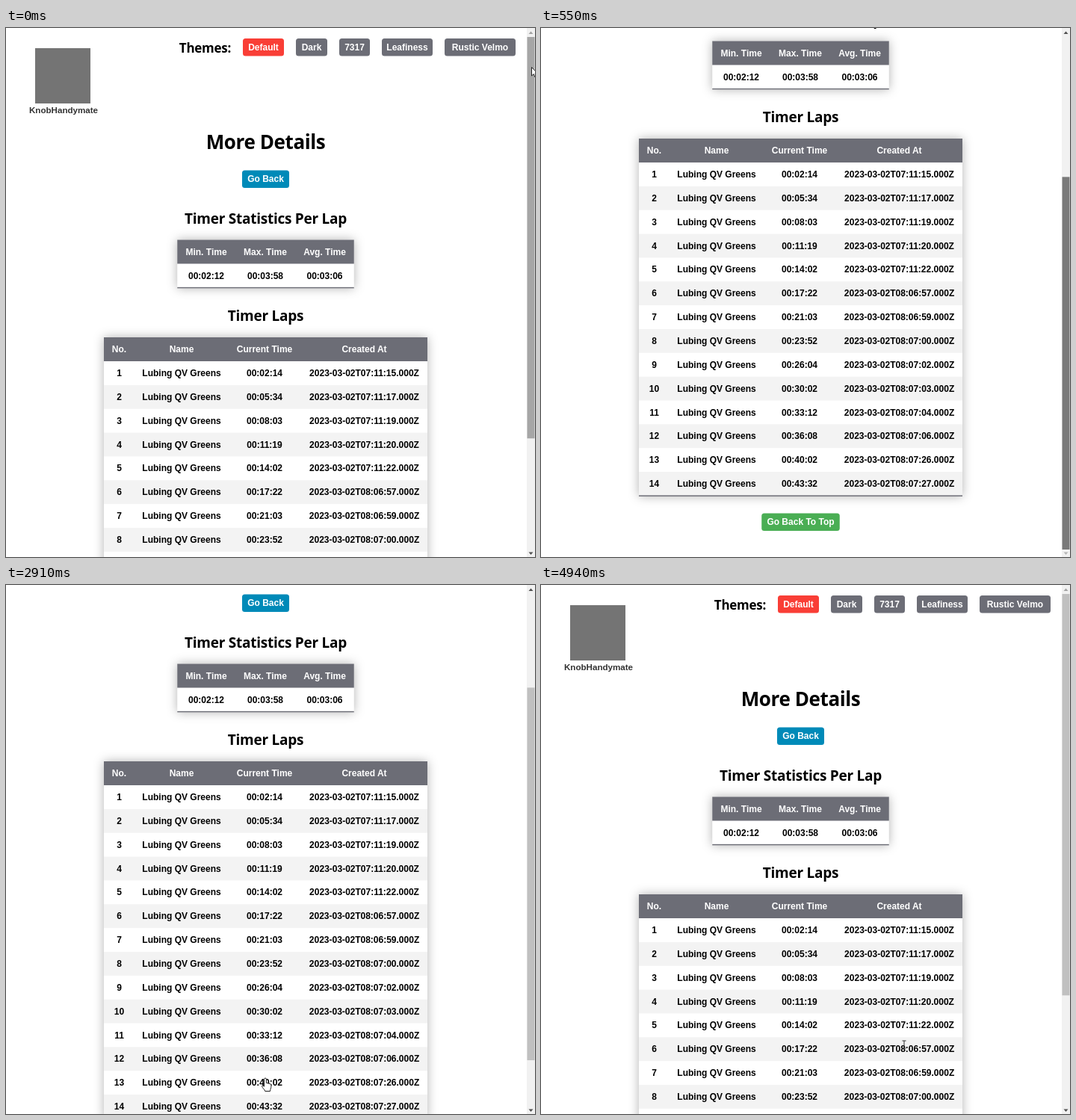
Recreate the animation shown at these times as an HTML page. Size 708 by 708 pixels, loop 4970 ms.

```html
<!DOCTYPE html>
<html lang="en">
<head>
<meta charset="utf-8">
<title>More Details</title>
<style>
  html, body { margin: 0; width: 100%; height: 100%; overflow: hidden; background: #fff; }
  svg { display: block; width: 708px; height: 708px; }
  text { font: bold 12px "Liberation Sans", Arial, sans-serif; text-anchor: middle; cursor: default; }
  .h1, .h2, .h3 { font-family: "Open Sans", "Noto Sans", sans-serif; }
  .h1 { font-size: 26px; letter-spacing: -.4px; }
  .h2 { font-size: 19px; letter-spacing: -.25px; }
  .h3 { font-size: 17px; letter-spacing: -.25px; }
  .brand { font-size: 11.6px; }
  .card { filter: drop-shadow(0 0 7px rgba(0, 0, 0, .3)); }
</style>
</head>
<body>
<svg id="stage" viewBox="0 0 708 708"></svg>
<script>
const LOOP = 4970;
const CENTER = 347.5;
const GREY = '#6c6d76';
const stage = document.getElementById('stage');

function add(parent, tag, attrs = {}, content = '') {
  const node = document.createElementNS('http://www.w3.org/2000/svg', tag);
  for (const key in attrs) node.setAttribute(key, attrs[key]);
  node.textContent = content;
  return parent.appendChild(node);
}

const page = add(stage, 'g');
const rect = (x, y, width, height, fill, more) =>
  add(page, 'rect', { x, y, width, height, fill, ...more });
const label = (content, x, y, fill = '#000', kind = '') =>
  add(page, 'text', { x, y, fill, class: kind }, content);

function button(content, center, top, width, fill) {
  const height = 23.5;
  rect(center - width / 2, top, width, height, fill, { rx: 3.5 });
  label(content, center, top + height / 2 + 4.2, '#fff');
}

// Columns are [heading, center]
function table(top, width, columns, rows) {
  const left = CENTER - width / 2, rowHeight = 31.85;
  const height = 33 + rows.length * rowHeight;
  rect(left, top, width, height, '#fff', { class: 'card' });
  rect(left, top, width, 32, GREY);
  columns.forEach(([head, x]) => label(head, x, top + 20.3, '#fff'));
  rows.forEach((row, r) => {
    const y = top + 32 + r * rowHeight;
    if (r % 2) rect(left, y, width, rowHeight, '#f3f3f3');
    row.forEach((cell, i) => label(cell, columns[i][1], y + 20));
  });
  rect(left, top + height - 1.5, width, 1.5, GREY);
}

// Page header
rect(39, 27, 74, 74, '#747474');
label('KnobHandymate', 77, 114, '#333', 'brand');
label('Themes:', 266.5, 33, '#000', 'h3');
const themes = { Default: 55, Dark: 42, '7317 ': 41, Leafiness: 68, 'Rustic Velmo': 95 };
let left = 317;
for (const name in themes) {
  const width = themes[name];
  button(name.trim(), left + width / 2, 14, width, name === 'Default' ? '#f93e36' : GREY);
  left += width + 16;
}

label('More Details', CENTER, 162, '#000', 'h1');
button('Go Back', CENTER, 190.5, 63, '#008ab8');

label('Timer Statistics Per Lap', CENTER, 261.5, '#000', 'h2');
table(283.5, 236.5, [['Min. Time', 268], ['Max. Time', 347], ['Avg. Time', 426.5]],
  [['00:02:12', '00:03:58', '00:03:06']]);

label('Timer Laps', CENTER, 392, '#000', 'h2');
const laps = `02:14 07:11:15,05:34 07:11:17,08:03 07:11:19,11:19 07:11:20,14:02 07:11:22,
  17:22 08:06:57,21:03 08:06:59,23:52 08:07:00,26:04 08:07:02,30:02 08:07:03,
  33:12 08:07:04,36:08 08:07:06,40:02 08:07:26,43:32 08:07:27`.split(',').map((lap, i) => {
  const [time, created] = lap.trim().split(' ');
  return [i + 1, 'Lubing QV Greens', `00:${time}`, `2023-03-02T${created}.000Z`];
});
table(414, 433,
  [['No.', 151.5], ['Name', 235], ['Current Time', 346], ['Created At', 479.5]], laps);
button('Go Back To Top', CENTER, 915.5, 104.5, '#4aae54');

// Scrollbar
add(stage, 'rect', { x: 697, width: 11, height: 708, fill: '#f1f1f1' });
const thumb = add(stage, 'rect', { x: 697.5, width: 10 });
const upArrow = add(stage, 'path', { d: 'M699.5 8l3-3.5 3 3.5z' });
const downArrow = add(stage, 'path', { d: 'M699.5 701.5l3 3.5 3-3.5z' });

// Mouse pointers, each with its hot spot at 0,0
const outline = { fill: '#fff', stroke: '#222', 'stroke-linejoin': 'round' };
const pointers = {
  arrow: add(stage, 'path', { ...outline, d: 'M.5 .5V12L3.2 9.6L5 14L6.9 13.2L5 9H8.6Z' }),
  hand: add(stage, 'path', { ...outline,
    d: 'M-1.4 1.4a1.4 1.4 0 0 1 2.8 0V6.4L6 7.4q2 .5 2 2.6c0 3.6-1.5 4.5-1.5 7.5H-.3c0-2-3.7-4-4.2-7q.3-1.5 3.1 .6Z' }),
  beam: add(stage, 'path', { fill: 'none', stroke: '#333', d: 'M-2.5 -5H2.5M0 -5V5M-2.5 5H2.5' })
};

const MAX_SCROLL = 266;
const progress = (t, from, length) => Math.min(1, Math.max(0, (t - from) / length));
const easeInOut = k => k * k * (3 - 2 * k);

// The thumb is dragged down, later the button scrolls back up
function scrollAt(t) {
  const down = progress(t, 0, 550) ** 1.19;
  const up = easeInOut(progress(t, 2728, 475));
  return MAX_SCROLL * (down - up);
}

// Key points of the mouse path: time, x, y
const path = [
  [0, 703, 52], [30, 712, 52], [700, 712, 320], [1090, 614, 640], [1640, 535, 657],
  [1700, 495, 658], [2300, 347, 660], [3940, 347, 661], [4490, 418, 645], [4640, 486, 615]
];

function mouseAt(t) {
  const next = path.findIndex(([time]) => time > t);
  if (next < 0) return path[path.length - 1].slice(1);
  const [t0, x0, y0] = path[next - 1], [t1, x1, y1] = path[next];
  const k = progress(t, t0, t1 - t0);
  return [Math.round(x0 + (x1 - x0) * k), Math.round(y0 + (y1 - y0) * k)];
}

function pointerAt(t, x) {
  if (t >= 3270) return x > 404 ? 'beam' : 'arrow';
  return t > 1700 && x < 400 ? 'hand' : 'arrow';
}

function draw(t) {
  const scroll = Math.round(scrollAt(t));
  page.setAttribute('transform', `translate(0 ${-scroll})`);

  // The page is shorter while the bottom button is hidden
  const ratio = 686 / (scroll > 20 ? 974 : 904);
  thumb.setAttribute('y', 12 + scroll * ratio);
  thumb.setAttribute('height', 708 * ratio);
  thumb.setAttribute('fill', t < 30 ? '#a6a6a6' : t < 800 ? '#7a7a7a' : '#c0c0c0');
  upArrow.setAttribute('fill', scroll > 0 ? '#505050' : '#a3a3a3');
  downArrow.setAttribute('fill', scroll < MAX_SCROLL ? '#505050' : '#b5b5b5');

  const [x, y] = mouseAt(t);
  const active = pointerAt(t, x);
  for (const name in pointers) {
    pointers[name].setAttribute('display', name === active ? 'inline' : 'none');
  }
  pointers[active].setAttribute('transform', `translate(${x} ${y})`);
}

const start = performance.now();
function tick() {
  draw((performance.now() - start) % LOOP);
  requestAnimationFrame(tick);
}
tick();
</script>
</body>
</html>
```
